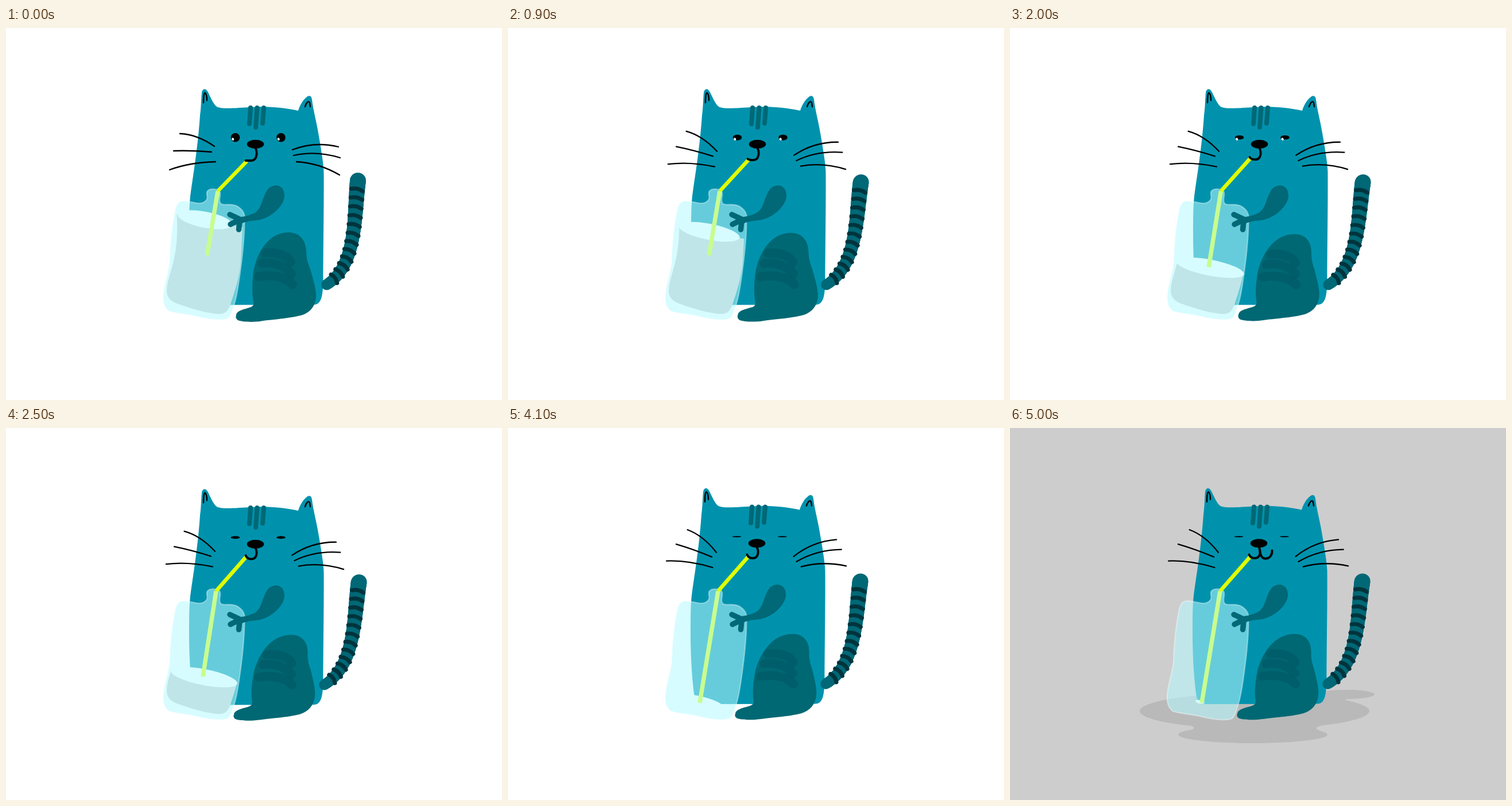
Recreate the animation shown at these times as an HTML page with a canvas. Size 864 by 648 pixels, loop 5.1 s.

```html
<!DOCTYPE html>
<html lang="en">
<head>
<meta charset="utf-8">
<title>Cat with a drink</title>
<style>
html, body { margin: 0; width: 100%; height: 100%; overflow: hidden; background: #fff; }
canvas { display: block; width: 100vw; height: 100vh; }
</style>
</head>
<body>
<canvas id="stage" width="864" height="648"></canvas>
<script>
const ctx = document.getElementById('stage').getContext('2d');
const LOOP = 5100, STEP = 100, FINALE = 5000;
const BODY = '#0092ad', LIMB = '#006876', DARK = '#00343d', STRAW = '#dfff00', INK = '#000';

const body = `M338 152 C340 138 340 122 341 113 C342 105 348 104 352 112 C357 122 361 132 367 137
  C374 142 405 139 425 138 C455 136 485 139 509 144 C512 134 517 126 523 121 C527 117 532 117 533 125
  C535 142 540 160 543.5 180 C549 212 553 235 553.5 250 C554 310 552.5 390 552.5 440 C552 465 550 482 536 482
  L345 482.5 C332 483 328 478 326 470 C322 445 319 400 319 360 C319 330 319 305 322 285 C330 232 335 195 338 152Z`;
const leg = `M401 500 C402 492 415 490 424 487 C431 485 432 482 431 476 C428 462 429 440 431 425
  C436 395 455 356 492 356 C512 356 522 370 523 388 C523 402 527 412 530 420 C534 435 541 455 540 468
  C539 485 530 495 516 500 C495 506 460 508 445 510.5 C430 513 412 512 404 509 C400 506 400 503 401 500Z`;
const legBands = ['M452 392 C472 390 490 396 496 408', 'M446 410 C466 407 486 414 497 428',
  'M440 433 C465 428 490 435 499 447'];
const arm = `M456 281 C466 270 485 272 485 292 C485 310 460 333 436 335 C424 336 414 338 408 342
  L404 330 C412 329 430 326 437 319 C446 311 447 293 456 281Z`;
const fingers = 'M407 333 L390 325 M405 335 L391 342 M407 336 L405.5 351';
const glass = `M299 306 C304 298 316 302 328 304 C340 307 347 304 350 298 C352 293 347 286 352 283
  C357 279 368 280 372 284 C376 290 369 300 374 306 C380 310 392 305 402 310 C411 315 417 323 415.5 334
  C415.5 360 413 385 411 402 C407 435 403 465 398 480 C394 492 392 502 387 506 C375 511 350 507 330 502
  C312 498 292 497 283 493 C275 486 273 477 274 465 C275 445 284 425 285 405 C286 370 289 345 294 320
  C295 314 296 309 299 306Z`;
const inside = `M296 300 C300 350 298 375 294 395 C290 420 280 440 280 458 C280 470 288 476 298 480
  C325 490 355 498 372 498 C384 498 389 490 393 475 C402 450 408 425 409 405 C411 380 412 350 413 320Z`;
const forehead = 'M426 139 L424 167 M437.5 139 L435 173 M449 139 L447 166';
const ears = 'M344 130 C344 118 345 112 347 113 C349 115 350 120 350 126 M521 137 C523 130 527 126 529 130 L530 137';
const leftWhiskers = 'M303 184 Q332 185 363 206 M292 214 Q325 213 358 216 M285 247 Q320 234 365 233';
const rightWhiskers = 'M499 212 Q538 197 579 207 M501 222 Q540 213 582 226 M506 233 Q545 235 581 256';

// Linear progress from 0 to 1 between two times
const ramp = (t, from, to) => Math.min(Math.max((t - from) / (to - from), 0), 1);
const mix = (a, b, k) => a + (b - a) * k;
const rad = deg => deg * Math.PI / 180;

function fill(path, color) {
  ctx.fillStyle = color;
  ctx.fill(new Path2D(path));
}

function line(path, color, width, cap = 'round') {
  ctx.strokeStyle = color;
  ctx.lineWidth = width;
  ctx.lineCap = cap;
  ctx.lineJoin = 'round';
  ctx.stroke(new Path2D(path));
}

function oval(x, y, rx, ry, color, angle = 0) {
  ctx.fillStyle = color;
  ctx.beginPath();
  ctx.ellipse(x, y, rx, ry, angle, 0, Math.PI * 2);
  ctx.fill();
}

function group(paint) {
  ctx.save();
  paint();
  ctx.restore();
}

function turned(x, y, deg, paint) {
  group(() => {
    ctx.translate(x, y);
    ctx.rotate(rad(deg));
    ctx.translate(-x, -y);
    paint();
  });
}

// Lean sideways and squash, keeping the point (0, y) fixed
function lean(y, shear, squash) {
  ctx.transform(1, 0, -shear, 1 - squash, shear * y, squash * y);
}

function drawShadow() {
  const color = '#b9b9b9';
  oval(426, 493, 200, 31, color);
  oval(423, 534, 130, 15, color);
  oval(585, 464, 50, 8, color);
  fill('M310 517 Q330 522 312 527 L540 527 Q524 522 548 517Z', color);
  fill('M540 460 L590 457 L590 472 Q576 473 592 479 L540 475Z', color);
}

// Centre line of the tail from top (0) to root (1)
function tailPoint(u) {
  const v = 1 - u;
  const curve = (a, b, c, d) => a * v ** 3 + 3 * b * v * v * u + 3 * c * v * u * u + d * u ** 3;
  return [curve(613, 606, 612, 557), curve(266, 330, 415, 448)];
}

function drawTail(t) {
  const k = ramp(t, 0, 500);
  ctx.translate(0, 2 * k);
  lean(320, .03 * k, .015 * k);
  for (let u = 0; u <= 1; u += .01) oval(...tailPoint(u), 14 - 4.5 * u, 14 - 4.5 * u, LIMB);
  for (let i = 0; i < 12; i++) {
    const u = .08 + i * .0745;
    const [x, y] = tailPoint(u), [nx, ny] = tailPoint(u + .01);
    const deg = Math.atan2(x - nx, ny - y) / rad(1) + 5;
    const half = 10.5 - 1.5 * u;
    turned(x, y, deg, () => line(`M${x - half} ${y} q${half} -4 ${2 * half} 1`, DARK, 7));
  }
}

function drawLeg(t) {
  const k = ramp(t, 600, 2500);
  lean(435, .06 * k, 0);
  lean(460, 0, .04 * k);
  fill(leg, '#006873');
  for (const band of legBands) line(band, 'rgba(0,82,95,.45)', 16);
}

function drinkLevel(t) {
  return 334 + 21 * ramp(t, 0, 900) + 46 * ramp(t, 900, 1500) + 33 * ramp(t, 1500, 2500) + 46 * ramp(t, 2500, 3700);
}

function drawDrink(t) {
  const y = drinkLevel(t), last = ramp(t, 4100, FINALE);
  const x = 352 - (y - 380) ** 2 / 420;
  const width = 60 - (y - 410) ** 2 / 500;
  group(() => {
    const edge = px => y + .2 * (px - x);
    ctx.clip(new Path2D(`M260 ${edge(260)} L430 ${edge(430)} V520 H260Z`));
    ctx.translate(0, -40 * ramp(t, 3100, 3800));
    fill(inside, '#ccc');
  });
  oval(mix(x, 331, last), mix(y, 477, last), mix(width, 8, last), mix(14, 3, last), '#fff', rad(11));
}

const lipHeight = t => 231 - 3 * ramp(t, 0, 900) - 6 * ramp(t, 1500, 2500);

function drawStraw(t, upper) {
  const bend = 369 - 3 * ramp(t, 1500, 2500);
  const end = Math.max(396, drinkLevel(t) - 1);
  if (upper) line(`M419.5 ${lipHeight(t) + 1} L${bend} 284`, STRAW, 6.5, 'butt');
  else line(`M${bend} 284 L${350 - (end - 397) * .195} ${end}`, STRAW, 7.5, 'butt');
}

function drawFace(t) {
  line(forehead, LIMB, 8);
  line(ears, INK, 2.4);

  const tilt = 13 * ramp(t, 0, 500) + 5 * ramp(t, 2500, 3000);
  turned(325, 215, tilt, () => line(leftWhiskers, INK, 2.3));
  turned(541, 220, -tilt, () => line(rightWhiskers, INK, 2.3));

  const open = 7.7 - 2.7 * ramp(t, 0, 900) - 4 * ramp(t, 1500, 3000);
  for (const x of [399.5, 479]) {
    oval(x, 190.7, 7.8, open, INK);
    if (open > 3.5) oval(x - 4.3, 193.6, 2, 2.4, '#fff', -.5);
  }

  oval(434.5, 202.3, 14.8, 7.6, INK);
  const lip = lipHeight(t), low = mix(lip, 231, .7);
  line(`M434.5 209 C438 216 438 ${low} 427 ${low} Q420 ${low} 417.5 ${lip}`, INK, 3.8);
  const sipping = t >= 2900 && t < 3500;
  if (sipping) line('M417 223 C417 217 426 217 426 223', INK, 3.4);
  if (t >= FINALE) line('M436 214 C437 224 440 229 446 229 C453 229 458 223 457.5 215', INK, 3.8);
}

function draw(t) {
  const finale = t >= FINALE, rise = ramp(t, 2500, 4100);
  const catPart = paint => group(() => {
    ctx.translate(-rise, -1.5 * rise);
    paint(t);
  });

  ctx.fillStyle = finale ? '#cdcdcd' : '#fff';
  ctx.fillRect(0, 0, 864, 648);
  if (finale) drawShadow();
  catPart(() => fill(body, BODY));
  catPart(drawTail);
  catPart(drawLeg);
  drawDrink(t);
  drawStraw(t, false);
  fill(glass, 'rgba(182,250,255,.56)');
  line(glass, 'rgba(255,255,255,.36)', 2.2);
  drawStraw(t, true);
  catPart(() => fill(arm, LIMB));
  line(fingers, LIMB, 9.5);
  catPart(drawFace);
}

let shown = -1;
function tick() {
  let t = Math.floor(performance.now() % LOOP / STEP) * STEP;
  if (t > 3800 && t < 4100) t = 3800; // short rest before the last sip
  if (t !== shown) draw(shown = t);
  requestAnimationFrame(tick);
}
tick();
</script>
</body>
</html>
```
